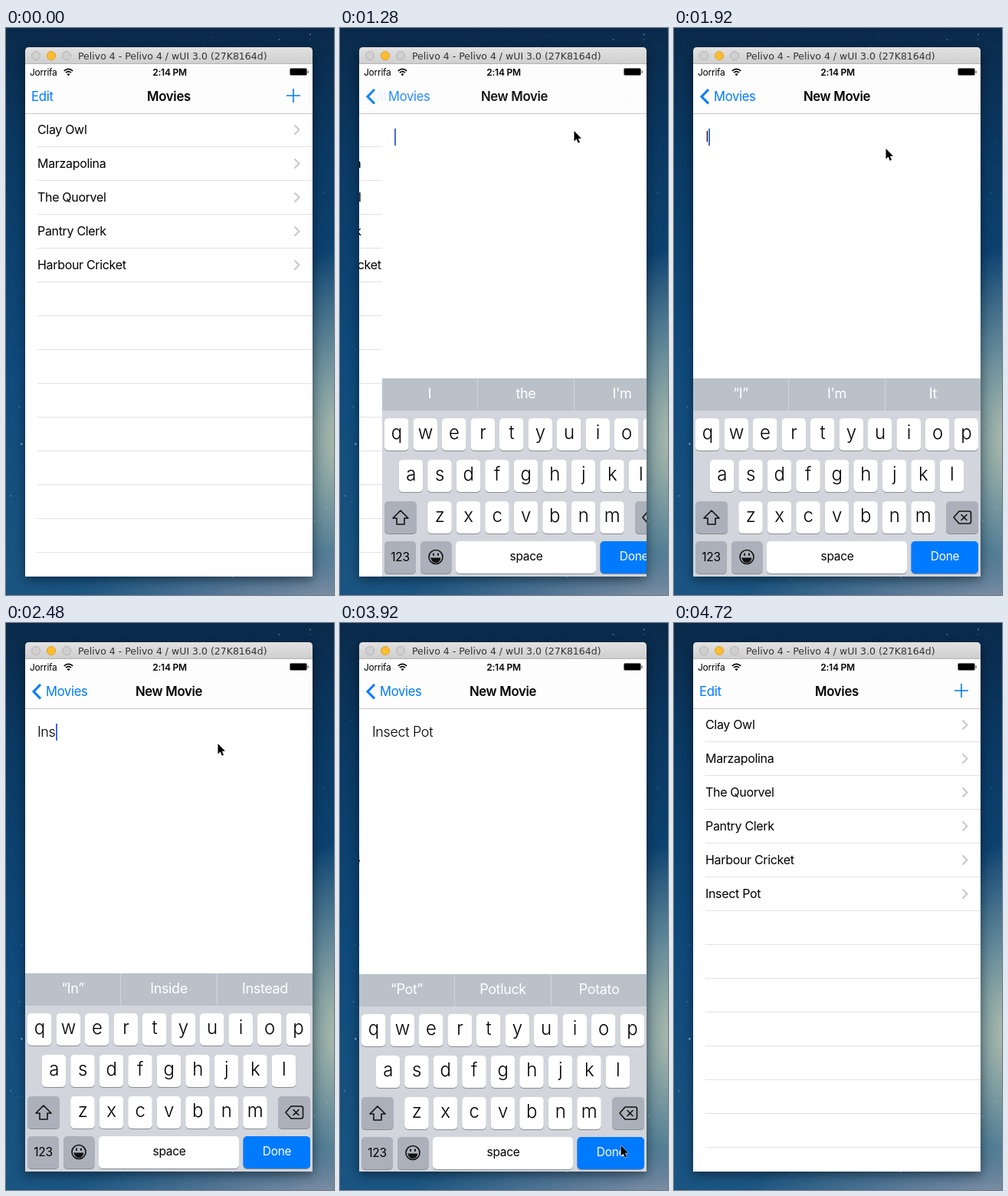
Write an HTML page that moves like this. It is 428 by 738 pixels and loops after 5440 ms.

```html
<!DOCTYPE html>
<html lang="en">
<head>
<meta charset="utf-8">
<title>Adding a movie</title>
<style>
  html, body { margin: 0; width: 100%; height: 100%; overflow: hidden; }
  body {
    position: relative;
    background:
      radial-gradient(ellipse 340px 60px at 425px 742px, #7f90a4, #7f90a400),
      radial-gradient(ellipse 110px 250px at 436px 535px, #b3c0ad, #86a3a4c0 45%, #7f9c9f00),
      linear-gradient(#0a2a4a, #0a3963 22%, #0f4a7b 60%, #1a5480);
  }
  #shadow { position: absolute; left: 25px; top: 25px; width: 375px; height: 689px;
    border-radius: 5px 5px 0 0; box-shadow: 0 4px 14px rgba(0, 0, 0, .45); }
  svg { position: absolute; left: 0; top: 0; }
  text { font-family: Inter, Roboto, sans-serif; letter-spacing: -.02em; white-space: pre; }
  .title { font-family: "DejaVu Sans", "Noto Sans", sans-serif; letter-spacing: 0; }
  .mid { text-anchor: middle; }
  .bold { font-weight: 600; }
  .thin { font-weight: 300; }
  .line { fill: none; stroke: #111; stroke-width: 1.6; stroke-linejoin: round; stroke-linecap: round; }
</style>
</head>
<body>
<div id="shadow"></div>
<script>
const LOOP = 5440, STEP = 80, PUSH = 1090, POP = 3917;
const BLUE = '#007aff';
const movies = ['Clay Owl', 'Marzapolina', 'The Quorvel', 'Pantry Clerk', 'Harbour Cricket'];
const newMovie = 'Insect Pot';
const keyTimes = [1680, 2080, 2440, 2560, 2640, 2720, 2880, 2960, 3040, 3120];
const hints = [
  [0, 'I', 'the', 'I\'m'],
  [1760, '“I”', 'I\'m', 'It'],
  [2160, '“In”', 'Inside', 'Instead'],
  [2640, '“Inse”', 'Insert', 'Insects'],
  [2960, '“Inse”', 'Insects', 'Insider'],
  [3280, '“Pot”', 'Potluck', 'Potato']
];
// time, x, y of the pointer tip
const pointerPath = [
  [40, 10, 424], [560, 362, 99], [720, 368, 85], [1080, 368, 85], [1400, 276, 157],
  [3120, 276, 157], [3200, 264, 162], [3400, 310, 510], [3680, 366, 680],
  [3920, 366, 680], [4080, 366, 673], [4480, 366, 673], [4720, 392, 742]
];

const range = (n, f) => Array.from({ length: n }, (_, i) => f(i)).join('');
const text = (s, x, y, size, cls = '', fill = '#000', id = '') =>
  `<text id="${id}" x="${x}" y="${y}" font-size="${size}" class="${cls}" fill="${fill}">${s}</text>`;
const rect = (x, y, w, h, fill, more = '') =>
  `<rect x="${x}" y="${y}" width="${w}" height="${h}" fill="${fill}" ${more}/>`;
const key = (x, y, w, fill = '#fff') =>
  rect(x, y + 1, w, 42, '#898c92', 'rx="5"') + rect(x, y, w, 42, fill, 'rx="5"');

let seed = 7;
const random = () => (seed = seed * 16807 % 2147483647) / 2147483647;
const stars = range(420, () =>
  `<circle cx="${random() * 428}" cy="${random() * 738}" r="${.3 + random() ** 6}" opacity="${.1 + random() * .4}"/>`);

const titleBar = `
  <path d="M25 47V30q0-5 5-5H395q5 0 5 5V47Z" fill="url(#bar)"/>
  ${rect(25, 46, 375, 1, '#b4b4b4')}
  <g stroke="#b2b2b2" fill="#d0d0d0">
    <circle cx="39" cy="36" r="5.5"/><circle cx="79" cy="36" r="5.5"/>
    <circle cx="59" cy="36" r="5.5" fill="#fdbd2f" stroke="#dfa025"/>
  </g>
  ${text('Pelivo 4 - Pelivo 4 / wUI 3.0 (27K8164d)', 94, 41, 12.5, 'title', '#333')}`;

const statusBar = `
  ${text('Jorrifa', 31, 62, 12)}
  <path d="M75.8 55.8q5.7-5 11.4 0M78 58.2q3.5-3 7 0" fill="none" stroke="#000" stroke-width="1.7"/>
  <path d="M79.4 60q2.1-1.6 4.2 0l-2.1 2.2Z"/>
  ${text('2:14 PM', 213.5, 61.5, 12, 'mid bold')}
  ${rect(370.5, 52.5, 22, 9, 'none', 'stroke="#777" rx="1.5"')}
  ${rect(371, 53, 21, 8, '#000', 'rx=".8"')}${rect(393.5, 55.500, 1.2, 3.4, '#555')}`;

const row = (name, i) => `<g id="row${i}">
  ${text(name, 41, 138 + 44 * i, 16)}
  <path d="M376.500 ${126.5 + 44 * i}l6 6l-6 6" fill="none" stroke="#c7c7cc" stroke-width="2"/></g>`;
const list = rect(25, 112, 375, 602, '#fff') +
  range(13, i => rect(41, 154 + 44 * i, 359, 1, '#e1e1e3')) + [...movies, newMovie].map(row).join('');

const letterRows = ['qwertyuiop', 'asdfghjkl', 'zxcvbnm'].map((letters, r) => {
  const left = [28, 46.75, 84.25][r], y = 508 + 54 * r;
  return [...letters].map((c, i) =>
    key(left + 37.5 * i, y, 31.5) + text(c, left + 37.5 * i + 15.75, y + 27, 24, 'mid thin')).join('');
}).join('');

const keyboard = `
  ${rect(25, 456, 375, 258, '#d2d5db')}${rect(25, 456, 375, 42, '#bac1c9')}
  ${rect(149, 456, 1, 42, '#d0d5db')}${rect(275, 456, 1, 42, '#d0d5db')}
  ${range(3, i => text('', 87 + 125.5 * i, 482, 18, 'mid', '#fff', 'hint' + i))}
  ${letterRows}
  ${key(28, 616, 42, '#abb0ba')}${key(355, 616, 42, '#abb0ba')}
  ${key(28, 668, 41, '#abb0ba')}${key(75, 668, 40.5, '#abb0ba')}
  ${key(121, 668, 183, '#fff')}${key(309.5, 668, 87.5, BLUE)}
  <g class="line">
    <path d="M49 628l10 10h-5v8h-10v-8h-5Z"/>
    <path d="M365 637l7-8h13q2.5 0 2.5 2.5v11q0 2.5-2.5 2.5h-13ZM375 633.5l7 7M382 633.5l-7 7"/>
    <circle cx="95" cy="688.5" r="9"/>
    <path d="M89 690h12q-1 5.5-6 5.5t-6-5.5Z" fill="#111" stroke-width="1"/>
    <path d="M92 684.5v1.5M98 684.5v1.5" stroke-width="2"/>
  </g>
  ${text('123', 48.5, 694, 15.5, 'mid')}
  ${text('space', 213, 693, 15.5, 'mid')}
  ${text('Done', 353.5, 693, 15.5, 'mid', '#fff')}`;

document.body.insertAdjacentHTML('beforeend', `
<svg width="428" height="738" viewBox="0 0 428 738">
  <defs>
    <linearGradient id="bar" x2="0" y2="1"><stop stop-color="#e2e2e2"/><stop offset="1" stop-color="#cecece"/></linearGradient>
    <clipPath id="screen"><path d="M25 47H400V714H25Z"/></clipPath>
  </defs>
  <g fill="#d5e5f2">${stars}</g>
  ${titleBar}
  <g clip-path="url(#screen)">
    ${rect(25, 47, 375, 667, '#fff')}
    <g id="list">${list}</g>
    <g id="form">
      ${rect(25, 112, 375, 602, '#fff')}
      ${text('', 41, 148, 18, 'thin', '#000', 'field')}
      <rect id="caret" y="131" width="2" height="22" fill="#4468dc"/>
    </g>
    <g id="keyboard">${keyboard}</g>
    ${rect(25, 47, 375, 64, '#fdfdfd')}${rect(25, 111, 375, 1, '#c6c6c8')}
    ${statusBar}
    <g id="listNav">
      ${text('Edit', 33, 95, 16.8, '', BLUE)}
      <path id="plus" d="M366 88h18M375 79v18" stroke="${BLUE}" stroke-width="1.6"/>
    </g>
    ${text('Movies', 212.5, 95, 16.8, 'mid bold', '#000', 'listTitle')}
    ${text('New Movie', 212.5, 95, 16.8, 'mid bold', '#000', 'formTitle')}
    <path id="chevron" d="M45 80l-9 9.2l9 9.2" fill="none" stroke="${BLUE}" stroke-width="3"/>
    ${text('Movies', 52, 95, 16.6, '', BLUE, 'back')}
  </g>
  <path id="pointer" d="M.5 0V13.5L3.600 10.600L5.800 15.800L8 14.800L5.900 9.800H10Z" stroke="#fff" paint-order="stroke"/>
</svg>`);

const $ = id => document.getElementById(id);
const move = (id, x, y = 0) => $(id).setAttribute('transform', `translate(${Math.round(x)} ${Math.round(y)})`);
const fade = (id, opacity) => $(id).setAttribute('opacity', opacity);
const show = (id, on) => fade(id, on ? 1 : 0);

// critically damped spring from 0 to 1
const spring = ms => {
  const s = Math.max(0, ms) * .022;
  return 1 - (1 + s) * Math.exp(-s);
};

function pointerAt(t) {
  const i = pointerPath.findIndex(p => p[0] > t);
  if (i < 1) return null;
  const [t0, x0, y0] = pointerPath[i - 1], [t1, x1, y1] = pointerPath[i];
  const u = (t - t0) / (t1 - t0), k = u * u * (3 - 2 * u);
  return [x0 + (x1 - x0) * k, y0 + (y1 - y0) * k];
}

function draw(t) {
  const pushed = spring(t - PUSH), popped = spring(t - POP);
  const open = pushed * (1 - popped), closed = 1 - open;
  const leaving = t >= POP;

  move('list', -112 * open);
  move('form', 375 * closed);
  move('keyboard', leaving ? 0 : 375 * closed, 258 * popped);
  show('row5', leaving);

  fade('listNav', closed);
  fade('plus', t >= 960 && !leaving ? .25 : 1);
  move('listTitle', -134 * open);
  fade('listTitle', closed ** 2);
  move('formTitle', 187 * closed);
  fade('formTitle', open);
  fade('chevron', open);
  move('back', 134 * closed);
  fade('back', open ** 2);

  $('field').textContent = newMovie.slice(0, keyTimes.filter(k => k <= t).length);
  $('caret').setAttribute('x', 41 + Math.round($('field').getComputedTextLength()));
  show('caret', !leaving);
  const words = hints.findLast(h => h[0] <= t);
  for (let i = 0; i < 3; i++) $('hint' + i).textContent = words[i + 1];

  const tip = pointerAt(t);
  show('pointer', tip);
  if (tip) move('pointer', ...tip);
}

function tick() {
  draw(Math.floor(performance.now() % LOOP / STEP) * STEP);
  requestAnimationFrame(tick);
}
tick();
</script>
</body>
</html>
```
